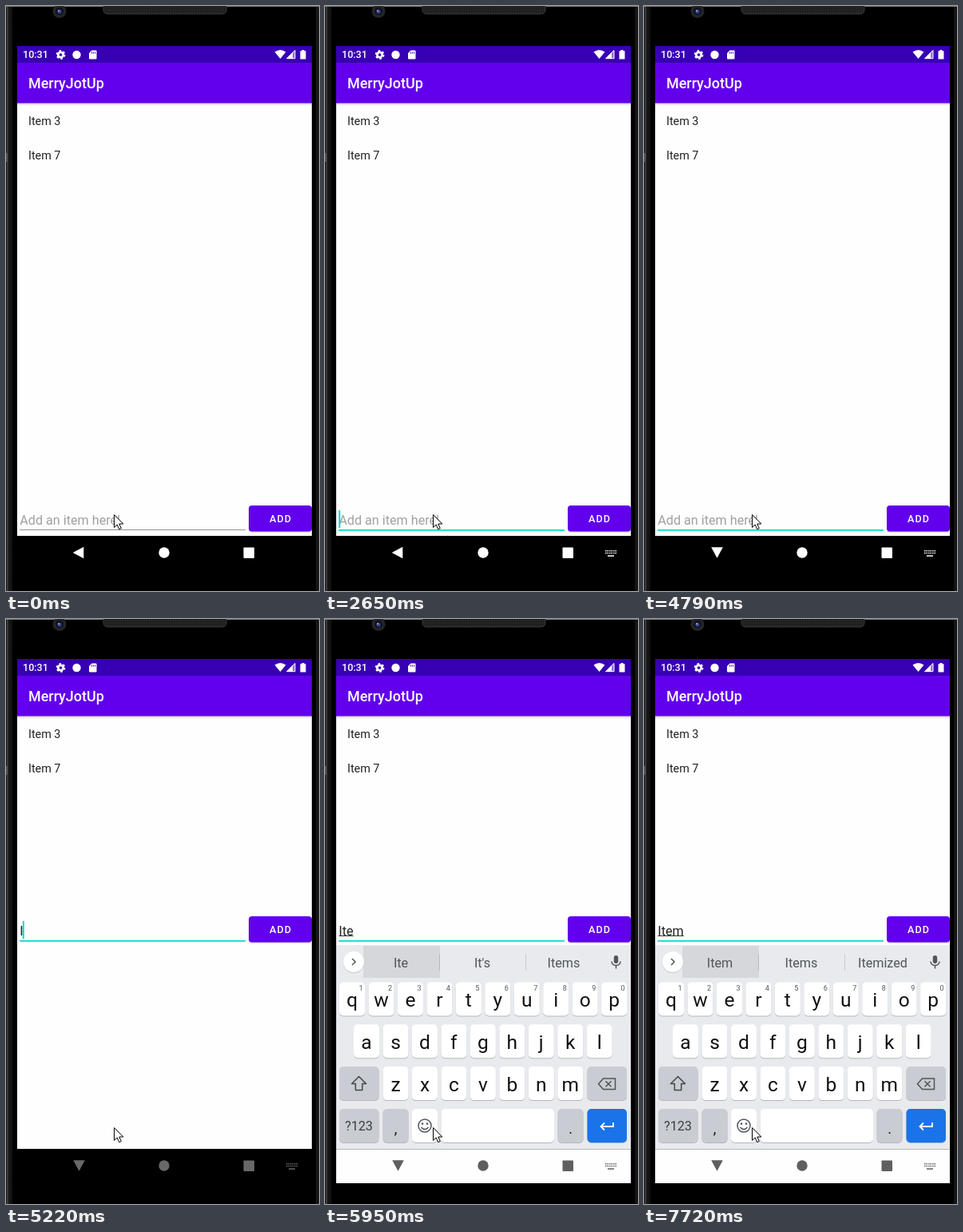
An HTML page that plays this animation: 392x732 px, repeating every 8 s.

```html
<!DOCTYPE html>
<html lang="en">
<head>
<meta charset="utf-8">
<title>To-do list</title>
<style>
html, body { margin: 0; width: 100%; height: 100%; overflow: hidden; background: #000; }
svg { display: block; width: 392px; height: 732px; font-family: Roboto, sans-serif; }
text { white-space: pre; }
.mid { text-anchor: middle; }
.line { fill: none; stroke: #50555a; stroke-width: 1.5; }
</style>
</head>
<body>
<svg viewBox="0 0 392 732" xmlns="http://www.w3.org/2000/svg">
  <defs>
    <linearGradient id="side">
      <stop offset="0" stop-color="#050505"/><stop offset=".2" stop-color="#4a4a4a"/>
      <stop offset=".36" stop-color="#191919"/><stop offset=".8" stop-color="#111"/><stop offset="1" stop-color="#000"/>
    </linearGradient>
    <linearGradient id="drop" x2="0" y2="1">
      <stop offset="0" stop-opacity=".2"/><stop offset="1" stop-opacity="0"/>
    </linearGradient>
    <pattern id="mesh" width="3" height="3" patternUnits="userSpaceOnUse">
      <rect width="3" height="3" fill="#262626"/><rect width="1.5" height="1.5" fill="#151515"/>
    </pattern>
  </defs>

  <!-- phone body -->
  <rect width="392" height="732"/>
  <rect width="9" height="732" fill="url(#side)"/>
  <rect x="388" width="4" height="732" fill="#151515"/>
  <rect width="392" height="1" fill="#777"/>
  <rect y="184" width="2" height="11" fill="#555"/>
  <rect x="122" y="-6" width="154" height="16" rx="5" fill="url(#mesh)" stroke="#3a3a3a"/>
  <circle cx="67" cy="6.5" r="8.5" fill="#252528"/>
  <circle cx="67" cy="6.5" r="5" fill="#11131f"/>
  <circle cx="67" cy="7" r="2.5" fill="#394690"/>
  <circle cx="66" cy="6" r="1" fill="#a5b0e8"/>

  <!-- app -->
  <rect x="14" y="50" width="369" height="613" fill="#fefefe"/>
  <rect x="14" y="121" width="369" height="4" fill="url(#drop)"/>
  <rect x="14" y="50" width="369" height="21" fill="#3700b3"/>
  <rect x="14" y="71" width="369" height="50.5" fill="#6200ee"/>
  <g fill="#fff">
    <text x="21" y="65.3" font-size="12.57" font-weight="500">10:31</text>
    <circle cx="68.5" cy="61" r="3.2" fill="none" stroke="#fff" stroke-width="2.7"/>
    <circle cx="68.5" cy="61" r="5" fill="none" stroke="#fff" stroke-width="1.8" stroke-dasharray="2.6 2.636"/>
    <circle cx="88.5" cy="61" r="5.2"/>
    <path d="M107.5 55.5h5q1 0 1 1v9q0 1-1 1h-7.5q-1 0-1-1v-6.500z"/>
    <path d="M107.500 57.500v2M109.500 57.500v2M111.500 57.500v2" stroke="#3700b3" stroke-width="1"/>
    <path d="M336.500 57.500q7-5 14 0l-7 8.500z"/>
    <path d="M362 55v11h-11z" opacity=".45"/>
    <path d="M359 58v8h-8z"/>
    <path d="M362 55.500v10.200h-10.200z" fill="none" stroke="#fff"/>
    <path d="M370.500 55h3v1.200h2v10.300h-7v-10.300h2z"/>
    <text x="28" y="103" font-size="17.96" font-weight="500">MerryJotUp</text>
  </g>
  <g fill="#212121" font-size="14.36">
    <text x="28" y="148.500">Item 3</text>
    <text x="28" y="191.500">Item 7</text>
  </g>

  <!-- entry row -->
  <g id="entry">
    <rect x="304" y="626.500" width="79" height="32" rx="4" opacity=".22"/>
    <rect x="304" y="625" width="79" height="32.500" rx="4" fill="#6200ee"/>
    <text class="mid" x="344" y="646.200" font-size="12.57" font-weight="500" letter-spacing="1.120" fill="#fff">ADD</text>
    <rect id="rule" x="17" width="283"/>
    <text id="typed" x="17.300" y="648.500" font-size="16.160"></text>
    <rect id="mark" x="17.300" y="649" height="1" fill="#333"/>
    <rect id="caret" y="631" width="2" height="22" fill="#03dac5"/>
  </g>

  <g id="board">
    <rect x="14" y="408" width="369" height="255.500" fill="#e8eaed"/>
    <rect x="14" y="663.500" width="369" height="42.500" fill="#fefefe"/>
    <rect id="pick" x="48" y="409" width="96" height="40" fill="#d5d7db"/>
    <circle cx="36" cy="429.800" r="13.300" opacity=".12"/>
    <circle cx="36" cy="429" r="13" fill="#fff"/>
    <path id="chevron" class="line" stroke-width="1.800"/>
    <g id="search" class="line"><circle cx="84" cy="427.500" r="4.800"/><path d="M87.500 431l5.500 5.500" stroke-width="2"/></g>
    <g id="tools">
      <path class="line" d="M133.500 422.500h10q1.500 0 1.500 1.500v7l-5.500 5.500h-6q-1.500 0-1.500-1.500v-11q0-1.500 1.500-1.500zM145 431h-5.500v5.500M135 430q1.500 3 4 2.500"/>
      <path d="M135 426h2M140 426h2" stroke="#50555a" stroke-width="1.800"/>
      <text class="mid" x="191.500" y="433.200" font-size="11.500" font-weight="700" letter-spacing="1" fill="#50555a">GIF</text>
      <path class="line" d="M239.500 423.500h11.500v13h-11.500zM242 427.500h6.500M242 430.500h6.500M242 433.500h4.500"/>
      <rect x="242.500" y="421" width="5.500" height="4" rx="1" fill="#50555a"/>
      <rect x="277.500" y="419" width="1" height="21" fill="#cdd0d4"/>
      <g fill="#50555a"><circle cx="305" cy="429.500" r="1.800"/><circle cx="311" cy="429.500" r="1.800"/><circle cx="317" cy="429.500" r="1.800"/></g>
    </g>
    <g id="words" class="mid" font-size="16.160" fill="#50555a">
      <rect x="143" y="419" width="1" height="21" fill="#b5b8bc"/>
      <rect x="251" y="419" width="1" height="21" fill="#c8cacf"/>
    </g>
    <rect x="361.800" y="421" width="5.400" height="10" rx="2.700" fill="#50555a"/>
    <path class="line" d="M359 428.500q.5 5 5.500 5t5.500-5M364.500 433.500v4"/>
    <g id="keys" class="mid" fill="#111"></g>
    <path id="shift" d="M42.500 572.500l9 9h-4.800v8h-8.400v-8h-4.800z" stroke="#44484c" stroke-width="1.500" stroke-linejoin="round"/>
    <path class="line" d="M348.500 575h15v13.500h-15l-6-6.750zM351.500 578.200l7 7M358.500 578.200l-7 7"/>
    <circle class="line" cx="125" cy="634" r="8"/>
    <path class="line" d="M120.500 636q4.500 5 9 0"/>
    <circle cx="122" cy="631.500" r="1.300" fill="#50555a"/><circle cx="128" cy="631.500" r="1.300" fill="#50555a"/>
    <path d="M361 630v5h-15M350 630.500l-4.500 4.500 4.500 4.500" fill="none" stroke="#fff" stroke-width="1.800"/>
  </g>

  <!-- navigation -->
  <g id="nav">
    <path id="back" d="M-7.800 0L5.800-7.300V7.300z"/>
    <circle cx="198" cy="684" r="6.700"/>
    <rect x="297.500" y="677.500" width="13.500" height="13.500" rx=".8"/>
    <g id="ime"><rect x="354" y="687.300" width="8" height="1.500"/></g>
  </g>

  <path d="M135.500 636.500v16l3.700-3.500 2.500 5.700 2.600-1.100-2.500-5.600h5z" fill="#fff" stroke="#000"/>
</svg>

<script>
const LOOP = 8000;
const $ = id => document.getElementById(id);

function add(parent, tag, attrs, label = '') {
  const el = document.createElementNS('http://www.w3.org/2000/svg', tag);
  for (const name in attrs) el.setAttribute(name, attrs[name]);
  el.textContent = label;
  return parent.appendChild(el);
}

function set(id, attrs) {
  for (const name in attrs) $(id).setAttribute(name, attrs[name]);
}

const show = (id, on) => set(id, { visibility: on ? 'visible' : 'hidden' });

function keyCap(x, y, w, fill = '#fff') {
  add($('keys'), 'rect', { x, y: y + 1, width: w, height: 42, rx: 5, fill: '#b4b7bb' });
  add($('keys'), 'rect', { x, y, width: w, height: 42, rx: 5, fill });
}

function keyText(x, y, size, label, fill = '#111') {
  return add($('keys'), 'text', { x, y, 'font-size': size, fill }, label);
}

const letters = [];
[['QWERTYUIOP', 34], ['ASDFGHJKL', 52], ['ZXCVBNM', 88.5]].forEach(([row, left], r) => {
  const y = 454.5 + r * 52.8;
  [...row].forEach((ch, i) => {
    const x = left + i * 36.46;
    keyCap(x - 16, y, 32);
    letters.push([keyText(x, y + 30.5, 24.5, ch), ch]);
    if (!r) keyText(x + 11, y + 10.5, 9, (i + 1) % 10, '#50555a');
  });
});

const GREY = '#c9ccd2';
keyCap(18, 560, 49.5, GREY);
keyCap(328.5, 560, 49.5, GREY);
[[18, 49.5, GREY], [72.5, 32, GREY], [109, 32], [145.5, 141.5], [291.5, 32, GREY], [328.5, 49.5, '#1a73e8']]
  .forEach(([x, w, fill]) => keyCap(x, 613, w, fill));
keyText(42.5, 640, 16.2, '?123', '#3c4043');
keyText(88.5, 644, 18, ',');
keyText(307.5, 644, 18, '.');

const words = [95, 197, 299].map(x => add($('words'), 'text', { x, y: 435.5 }));

for (let r = 0; r < 2; r++)
  for (let i = 0; i < 6; i++)
    add($('ime'), 'rect', { x: 351 + i * 2.5, y: 681 + r * 2.8, width: 1.5, height: 1.5 });

// Value of the last [time, value] step reached
const at = (steps, t) => steps.reduce((v, [time, value]) => t >= time ? value : v, steps[0][1]);

const TEXT = [[0, ''], [4940, 'I'], [5370, 'It'], [5520, 'Ite'], [6900, 'Item']];
const MARKED = [[0, ''], [5950, 'Ite'], [7320, 'Item']];
const BLINKS = [970, 1090, 1520, 2360, 2650, 3170, 3600, 4130, 4510, 4790, 4940, 5520, 6350, 6780, 6900, 7720];
const WORDS = [[0, ['', '', '']], [5520, ['Ite', "It's", 'Items']],
  [6900, ['Item', 'Items', '']], [7320, ['Item', 'Items', 'Itemized']]];
const TURN = [[0, 0], [2930, .2], [3050, .7], [3170, 1]];

function render(t) {
  const focus = t >= 970, raised = t >= 5220, board = t >= 5370, lower = t >= 5520;
  const text = at(TEXT, t), typed = $('typed');

  set('entry', { transform: `translate(0 ${raised ? -253 : 0})` });
  set('rule', { y: 655, height: focus ? 1.7 : 1, fill: focus ? '#03dac5' : '#929292' });

  const marked = at(MARKED, t);
  typed.textContent = marked || 'I';
  set('mark', { width: marked ? typed.getComputedTextLength() : 0 });
  typed.textContent = text || 'Add an item here!';
  typed.setAttribute('fill', text ? '#212121' : '#a0a0a0');
  const end = text ? typed.getComputedTextLength() - .8 : 0;
  set('caret', { x: 17.2 + end });
  show('caret', BLINKS.filter(b => t >= b).length % 2);

  set('board', { display: board ? 'inline' : 'none' });
  set('tools', { display: lower ? 'none' : 'inline' });
  set('words', { display: lower ? 'inline' : 'none' });
  set('pick', { display: lower ? 'inline' : 'none' });
  set('search', { opacity: at([[0, 1], [5520, .25], [5670, 0]], t) });
  set('chevron', { d: lower ? 'M34 425l4 4-4 4' : 'M38 425l-4 4 4 4' });
  set('shift', { fill: lower ? 'none' : '#44484c' });
  for (const [el, ch] of letters) el.textContent = lower ? ch.toLowerCase() : ch;
  at(WORDS, t).forEach((word, i) => words[i].textContent = word);

  const turn = at(TURN, t);
  set('nav', { fill: board ? '#5f5f5f' : raised ? '#686868' : '#fff' });
  set('back', { transform: `translate(91.5 ${684 - turn}) rotate(${-90 * turn})` });
  show('ime', t >= 2360);
}

function frame() {
  render(performance.now() % LOOP);
  requestAnimationFrame(frame);
}
frame();
</script>
</body>
</html>
```
